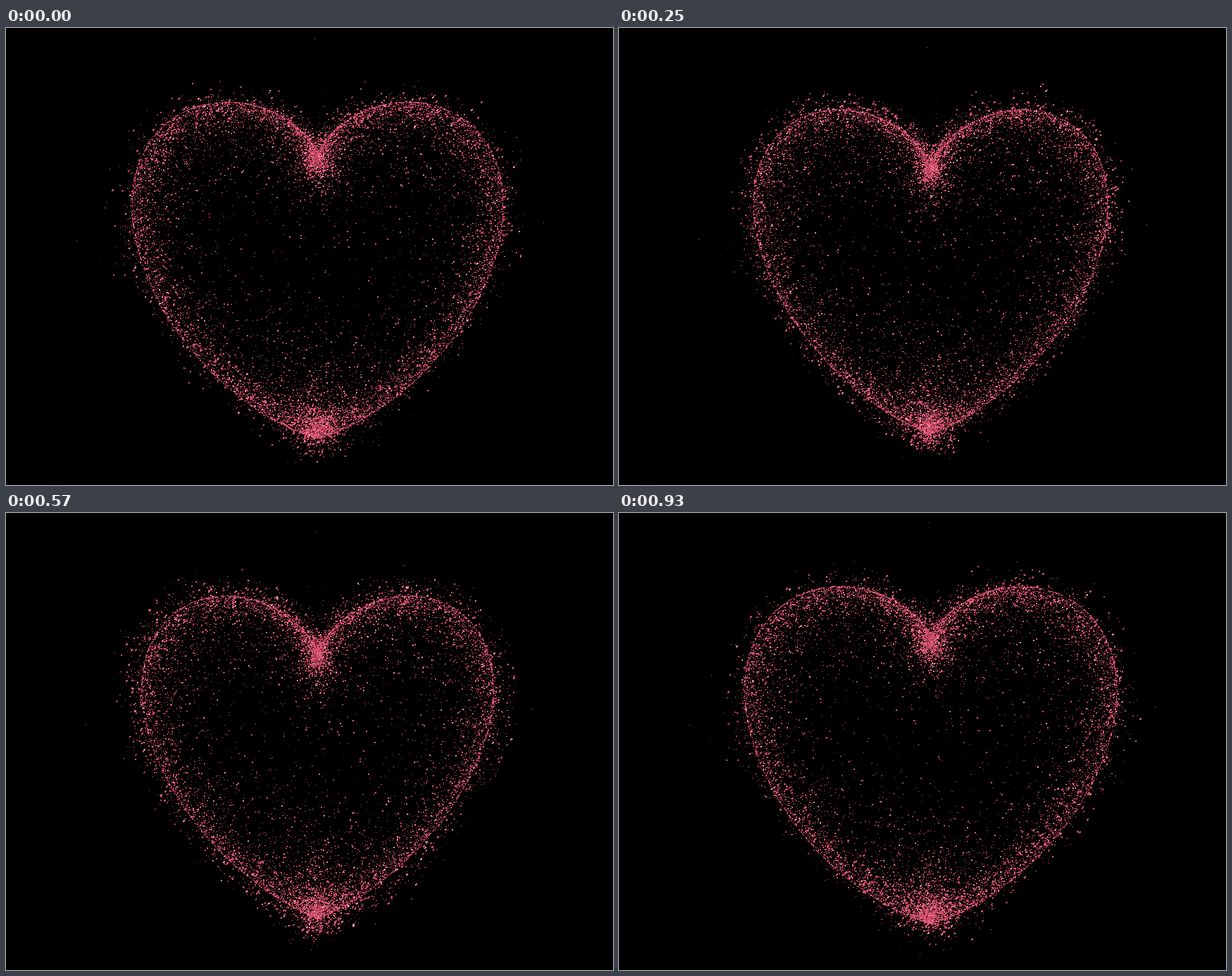
An HTML page with a canvas that plays this animation: 862 px wide and 649 px high, repeating every 0.97 s.

```html
<!DOCTYPE html>
<html lang="en">
<head>
<meta charset="utf-8">
<title>Beating heart</title>
<style>
  html, body { margin: 0; width: 100%; height: 100%; overflow: hidden; background: #000; }
  canvas { display: block; }
</style>
</head>
<body>
<canvas id="stage" width="862" height="649"></canvas>
<script>
const ctx = document.getElementById('stage').getContext('2d');
const TAU = Math.PI * 2;
const LOOP = 970, STEPS = 24;
const CX = 442, CY = 321;
const COLORS = ['#e85a78', '#e85a78', '#d94f6b', '#d94f6b', '#b8405a', '#9a344a', '#7c2a3b', '#ee8c9f'];

function makeRandom(seed) {
  return () => {
    seed = (seed + 0x6D2B79F5) | 0;
    let n = Math.imul(seed ^ (seed >>> 15), 1 | seed);
    n = (n + Math.imul(n ^ (n >>> 7), 61 | n)) ^ n;
    return ((n ^ (n >>> 14)) >>> 0) / 4294967296;
  };
}

const gauss = rnd => Math.sqrt(-2 * Math.log(1 - rnd())) * Math.cos(TAU * rnd());
const pick = rnd => COLORS[Math.floor(rnd() * COLORS.length)];

// Heart outline around the centre; the beat also bends it vertically.
function heart(t, beat) {
  const c2 = Math.cos(2 * t);
  return [
    255 * Math.sin(t) ** 3,
    -(240 * Math.cos(t) - 68.5 * c2 - 50.5 * Math.cos(3 * t) + 2.5 * Math.cos(4 * t)) - beat * (1.25 + 3.75 * c2)
  ];
}

function dot(x, y, size, color) {
  x = Math.round(x);
  y = Math.round(y);
  ctx.fillStyle = color;
  if (size < 3) {
    ctx.fillRect(x, y, size, size > 1 && (x + y) % 2 ? 1 : size);
  } else {
    ctx.fillRect(x, y, 2, 2);
    ctx.fillRect(x + 1, y - 1, 2, 2);
  }
}

// Outline particles, then two clouds drifting inwards from it.
const rnd = makeRandom(2024);
const particles = [];
function addCloud(count, depth, bigShare) {
  const inward = () => Math.min(1, -depth * Math.log(1 - rnd()));
  for (let i = 0; i < count; i++) {
    const ix = inward(), iy = inward();
    const blur = 55 * (ix + iy);
    particles.push({
      t: rnd() * TAU,
      kx: 1 - ix,
      ky: 1 - iy,
      dx: gauss(rnd) * blur,
      dy: gauss(rnd) * blur * 0.5,
      shake: depth ? 1.3 : 0.5,
      size: rnd() < bigShare ? 2 : 1,
      color: pick(rnd)
    });
  }
}
addCloud(2300, 0, 0.2);
addCloud(5600, 0.055, 0.3);
addCloud(5200, 0.18, 0.35);

function drawBody(step, beat) {
  const jitter = makeRandom(500 + step);
  const shake = () => Math.floor(jitter() * 3) - 1;
  for (const p of particles) {
    let [x, y] = heart(p.t, beat);
    x = x * p.kx + p.dx;
    y = y * p.ky + p.dy;
    const push = 1 + 9.5 * beat / Math.max(30, Math.hypot(x, y));
    dot(CX + x * push + shake() * p.shake, CY + y * push + shake() * p.shake, p.size, p.color);
  }
}

// The halo is reshuffled every step and runs back and forth.
function drawHalo(step, beat) {
  const key = step < 10 ? Math.min(step, 9 - step) : Math.min(step, 33 - step);
  const r = makeRandom(9000 + key * 77);
  const power = Math.abs(beat);
  const count = 2700 + 600 * power * power;
  for (let i = 0; i < count; i++) {
    const [x, y] = heart(r() * TAU, beat);
    const spread = (8 + 9 * power) * (0.4 + 0.6 * Math.hypot(x, y) / 260);
    const dx = gauss(r) * spread, dy = gauss(r) * spread;
    const s = r();
    dot(CX + x + dx, CY + y + dy, s < 0.55 ? 1 : s < 0.88 ? 2 : 3, pick(r));
  }
}

function stepAt(ms) {
  return ms < 210 ? Math.min(4, Math.floor(ms / 40)) : Math.min(STEPS - 1, 5 + Math.floor((ms - 210) / 40));
}

function draw(step) {
  const beat = Math.cos(TAU * (step + 1.5) / STEPS);
  ctx.fillStyle = '#000';
  ctx.fillRect(0, 0, 862, 649);
  drawHalo(step, beat);
  drawBody(step, beat);
}

let start = null, shown = 0;
function tick(now) {
  if (start === null) start = now;
  const step = stepAt(Math.max(0, now - start) % LOOP);
  if (step !== shown) draw(shown = step);
  requestAnimationFrame(tick);
}
draw(0);
requestAnimationFrame(tick);
</script>
</body>
</html>
```
